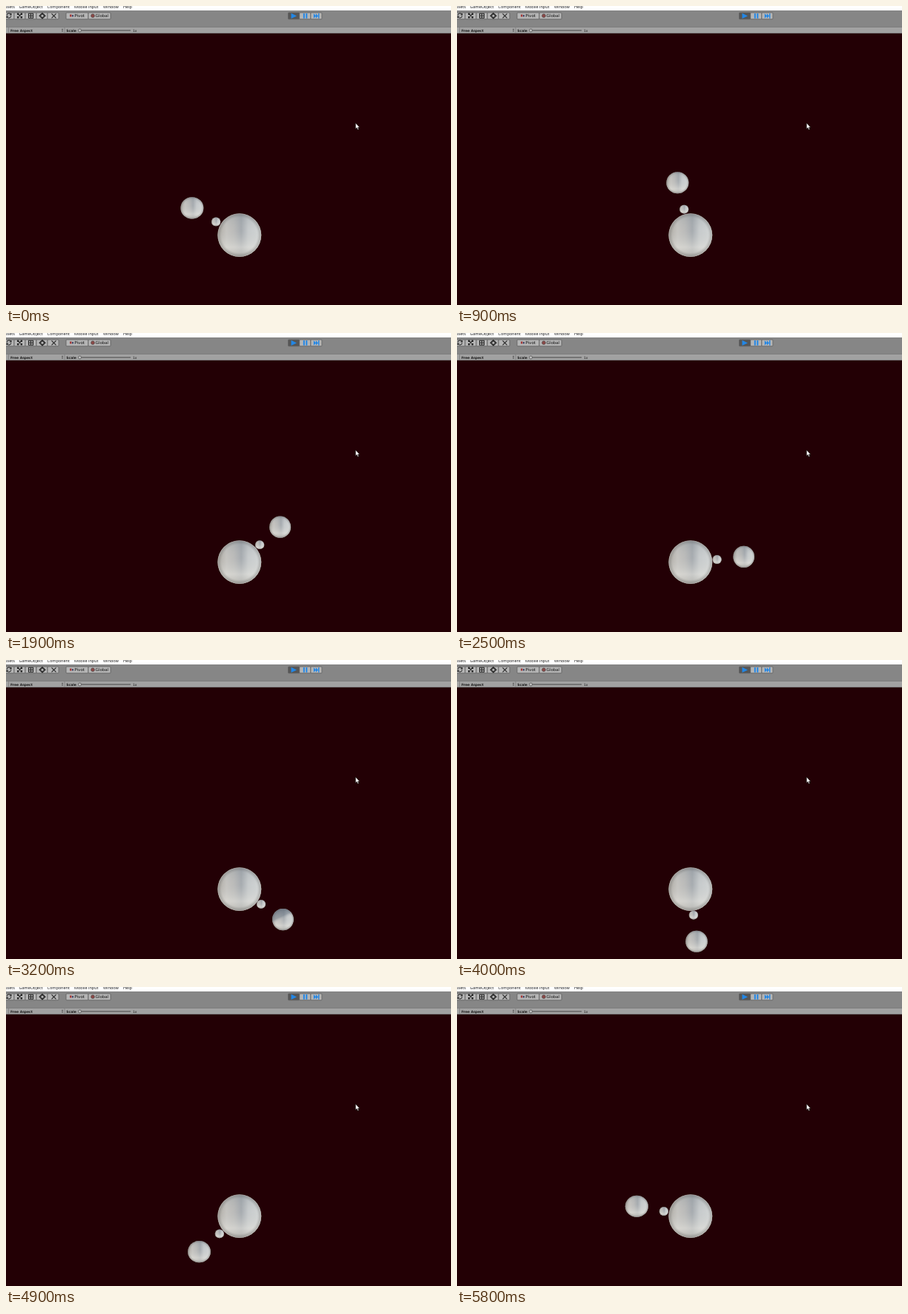
These frames come from a looping animation (600x404 px, 5900 ms). An HTML page:

```html
<!DOCTYPE html>
<html lang="en">
<head>
<meta charset="utf-8">
<title>Orbiting spheres</title>
<style>
  html, body { margin: 0; width: 100%; height: 100%; overflow: hidden; background: #230005; }
  svg { display: block; width: 600px; height: 404px; }
  .menu { font: 5.5px "Open Sans", sans-serif; fill: #111; }
  .tool { font: 5.6px "DejaVu Sans", sans-serif; fill: #161616; }
  .bar { font: bold 4.5px "DejaVu Sans", sans-serif; fill: #1c1c1c; }
  .btn { fill: #b5b5b5; stroke: #5d5d5d; stroke-width: .8; }
  .icon { fill: none; stroke: #252525; stroke-width: 1.1; }
  .blue { fill: #2387e5; }
</style>
</head>
<body>
<svg viewBox="0 0 600 404">
  <defs>
    <linearGradient id="side">
      <stop offset="0" stop-color="#aaa69f"/>
      <stop offset=".2" stop-color="#c5c3bf"/>
      <stop offset=".38" stop-color="#b9b9b8"/>
      <stop offset=".54" stop-color="#a3a8ad"/>
      <stop offset=".7" stop-color="#c6cacc"/>
      <stop offset="1" stop-color="#d5d8d8"/>
    </linearGradient>
    <linearGradient id="fall" x2="0" y2="1">
      <stop offset="0" stop-color="#7d8791" stop-opacity=".3"/>
      <stop offset=".4" stop-color="#c8cac8" stop-opacity=".1"/>
      <stop offset=".78" stop-color="#e3e2dc" stop-opacity=".6"/>
      <stop offset="1" stop-color="#b9b7b0" stop-opacity=".75"/>
    </linearGradient>
    <radialGradient id="rim">
      <stop offset=".82" stop-color="#60605e" stop-opacity="0"/>
      <stop offset="1" stop-color="#60605e" stop-opacity=".4"/>
    </radialGradient>
    <linearGradient id="shade" x1=".25" y1="0" x2=".55" y2=".65">
      <stop offset="0" stop-color="#596574" stop-opacity=".75"/>
      <stop offset=".55" stop-color="#6c7885" stop-opacity=".5"/>
      <stop offset=".8" stop-color="#c5c8ca" stop-opacity="0"/>
    </linearGradient>
    <g id="ball">
      <circle r="1" fill="url(#side)"/>
      <circle r="1" fill="url(#fall)"/>
      <circle r="1" fill="url(#rim)"/>
    </g>
  </defs>

  <rect width="600" height="404" fill="#230005"/>
  <rect width="600" height="6" fill="#fff"/>
  <rect y="6" width="600" height="22.5" fill="#868686"/>
  <rect y="28" width="600" height="9" fill="#a2a2a2"/>
  <path d="M0 28.5H600M0 36.7H600" stroke="#6e6e6e" stroke-width=".7"/>

  <g class="menu">
    <text x="-1" y="3">ssets</text>
    <text x="17.5" y="3">GameObject</text>
    <text x="55.5" y="3">Component</text>
    <text x="92" y="3">Mobile Input</text>
    <text x="131" y="3">Window</text>
    <text x="158" y="3">Help</text>
  </g>

  <g id="buttons"></g>
  <g class="icon">
    <path d="M1 12.5A3.2 3.2 0 0 1 6.5 11M7 10V12H5M7 13.5A3.2 3.2 0 0 1 1.5 15M1 16V14H3"/>
    <path d="M15.5 10L21.5 16M21.5 10L15.5 16M15.5 12V10H17.5M19.5 10H21.5V12M21.5 14V16H19.5M17.5 16H15.5V14"/>
    <path d="M30.5 10.2H36.5V16.2H30.5ZM30.5 13.2H36.5M33.5 10.2V16.2"/>
    <path d="M49 9.6L53 13.3L49 17L45 13.3ZM47 11.3H51V15.3H47Z"/>
    <path d="M61.5 10.3L67.5 16.3M67.5 10.3L61.5 16.3"/>
  </g>
  <rect x="86" y="11.5" width="2.5" height="3" fill="#a23b3b"/>
  <rect x="89" y="12" width="2" height="2.5" fill="#444f70"/>
  <text class="tool" x="92.3" y="15.3">Pivot</text>
  <circle cx="117" cy="13.2" r="2.4" fill="#8d4a48" stroke="#444" stroke-width=".6"/>
  <text class="tool" x="120.5" y="15.3">Global</text>

  <g class="blue">
    <path d="M384.5 9.8L392 13.4L384.5 17Z"/>
    <path d="M400.8 10H402.8V16.8H400.8ZM404.3 10H406.3V16.8H404.3Z"/>
    <path d="M414.8 10L418 13.4L414.8 16.8ZM417.8 10L421 13.4L417.8 16.8ZM421 10H422.4V16.8H421Z"/>
  </g>

  <g class="bar">
    <text x="6" y="34.5">Free Aspect</text>
    <text x="81.3" y="34.5">Scale</text>
    <text x="171" y="34.5" style="font-weight:400">1x</text>
  </g>
  <path d="M3.5 29V36.5M79 29V36.5" stroke="#797979" stroke-width=".7"/>
  <path d="M75 32.2L76 30.6L77 32.2ZM75 33.4L76 35L77 33.4Z" fill="#333"/>
  <path d="M101 33H168" stroke="#484848"/>
  <circle cx="99.5" cy="33" r="2" fill="#c4c4c4" stroke="#4b4b4b" stroke-width=".7"/>

  <use href="#ball" transform="translate(314.8 309.6) scale(29.4 29.1)"/>
  <circle cx="314.8" cy="309.6" r="29" fill="none" stroke="#d9d8d0" stroke-opacity=".55" stroke-width=".7"/>
  <use id="small" href="#ball"/>
  <g id="mid">
    <use href="#ball"/>
    <circle id="dark" r="1" fill="url(#shade)"/>
  </g>

  <path d="M471.3 158V166L473.1 164.4L474.3 167.2L475.6 166.6L474.5 164H476.8Z"
        fill="#fff" stroke="#000" stroke-width=".5"/>
</svg>
<script>
const LOOP = 5900, STEP = 100;
const el = id => document.getElementById(id);

// [time in ms, orbit angle in degrees]
const sweep = [
  [0, 209.9], [600, 239.7], [900, 256.7], [1200, 276], [1900, 319.6],
  [2400, 349], [3000, 384], [3200, 395.5], [4000, 443], [4900, 497.3], [5800, 550]
];

const button = (x, w, fill) =>
  `<rect class="btn" x="${x}" y="9" width="${w}" height="8.8" rx="1"${fill ? ` style="fill:${fill}"` : ''}/>`;
el('buttons').innerHTML =
  [-4, 11, 26, 41, 56].map(x => button(x, 15)).join('') +
  button(81, 30) + button(111, 30) +
  button(380.5, 15.2, '#565656') + button(395.7, 15.2) + button(410.9, 15);

function angleAt(t) {
  const i = Math.max(1, sweep.findIndex(p => p[0] >= t));
  const [t0, a0] = sweep[i - 1], [t1, a1] = sweep[i];
  return (a0 + (a1 - a0) * (t - t0) / (t1 - t0)) * Math.PI / 180;
}

function place(node, x, y, rx, ry) {
  node.setAttribute('transform', `translate(${x} ${y}) scale(${rx} ${ry})`);
}

function draw(now) {
  const t = Math.floor(now % LOOP / STEP) * STEP;
  const a = angleAt(t), c = Math.cos(a), s = Math.sin(a);
  place(el('mid'), 314.1 + 72.9 * c, 308.8 + 72 * s, 14.9 - .6 * c, 14.6);
  place(el('small'), 314.5 + 36.2 * c, 309.2 + 35.6 * s, 6.1, 5.9);
  // The inner spheres shade it while it passes the lower right.
  const facing = Math.max(0, Math.cos(a - Math.PI / 5));
  el('dark').setAttribute('opacity', facing ** 8);
}

const start = performance.now();
function tick() {
  draw(performance.now() - start);
  requestAnimationFrame(tick);
}
tick();
</script>
</body>
</html>
```
